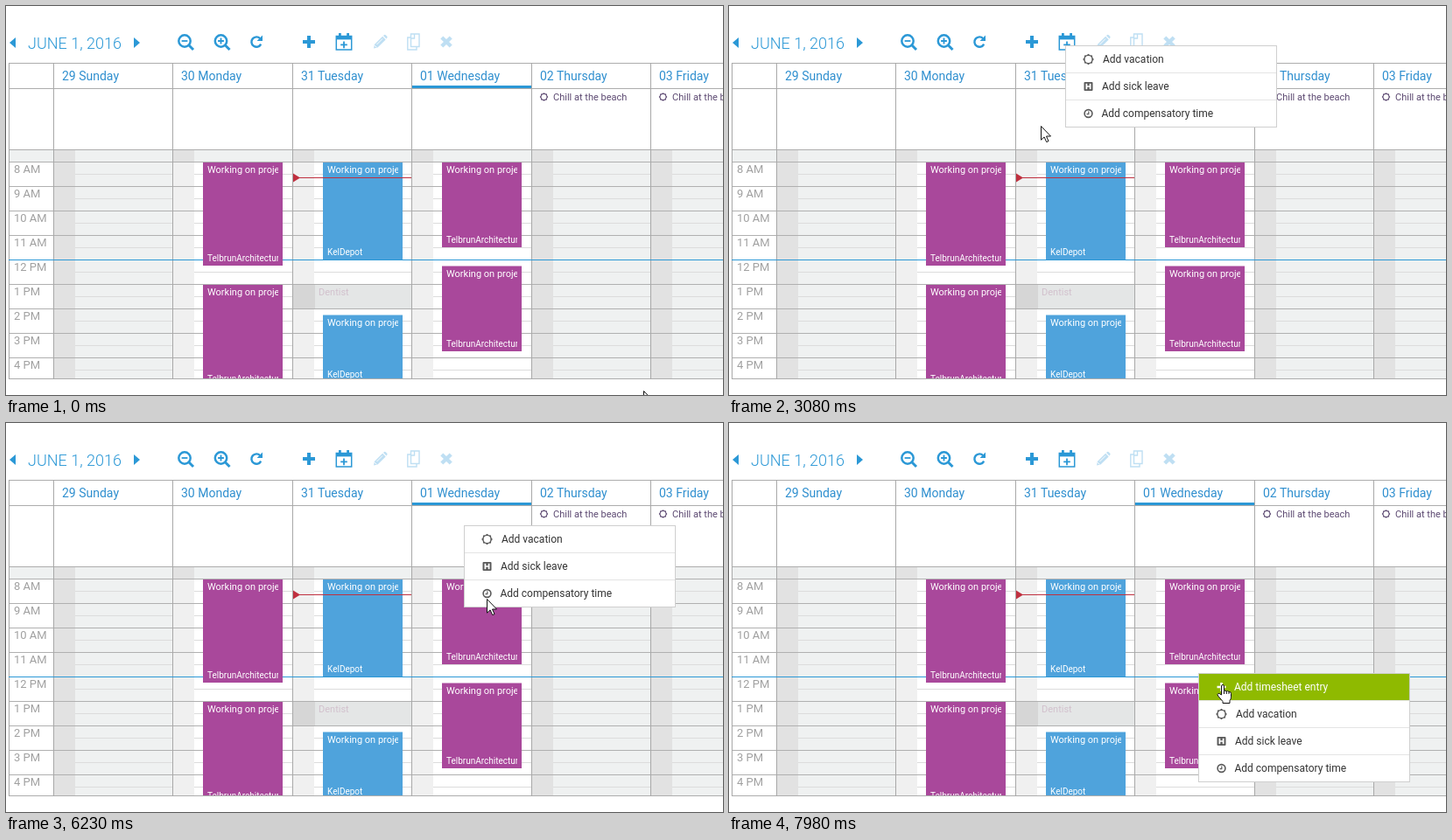
An HTML page that plays this animation: 819x445 px, repeating every 8 s.

```html
<!DOCTYPE html>
<html lang="en">
<head>
<meta charset="utf-8">
<title>Calendar context menu</title>
<style>
html, body { margin: 0; height: 100%; overflow: hidden; background: #fff; }
svg { display: block; }
text { font-family: Roboto, Arial, sans-serif; white-space: pre; }
.line { fill: none; stroke: currentColor; }
.solid { fill: currentColor; }
</style>
</head>
<body>
<svg width="819" height="445" viewBox="0 0 819 445">
  <g id="page"></g>
  <g id="live"></g>
</svg>
<script>
const BLUE = '#2b98d6', PALE = '#bfdff3', PURPLE = '#a9489b', SKY = '#4fa3dc', GREEN = '#8fba00';
const LOOP = 8000, TICK = 70, BOTTOM = 426;

const rect = (x, y, w, h, fill) => `<rect x="${x}" y="${y}" width="${w}" height="${h}" fill="${fill}"/>`;
const text = (x, y, size, fill, s, weight = 400) =>
  `<text x="${x}" y="${y}" font-size="${size}" font-weight="${weight}" fill="${fill}">${s}</text>`;
const at = (x, y, body, color = BLUE) => `<g transform="translate(${x} ${y})" color="${color}">${body}</g>`;
const crop = (x, y, w, h, body) => `<svg x="${x}" y="${y}" width="${w}" height="${h}">${body}</svg>`;
const solid = d => `<path class="solid" fill-rule="evenodd" d="${d}"/>`;
const line = (d, w) => `<path class="line" stroke-width="${w}" d="${d}"/>`;

// Icons, each centred on its own origin
const ring = (r, w) => `<circle class="line" r="${r}" stroke-width="${w}"/>`;
function sun(r) {
  let d = '';
  for (let i = 0; i < 16; i++) {
    const a = i * Math.PI / 8, q = i % 2 ? r * .82 : r;
    d += (i ? 'L' : 'M') + (q * Math.cos(a)).toFixed(2) + ' ' + (q * Math.sin(a)).toFixed(2);
  }
  const c = r * .62;
  return solid(`${d}ZM${-c} 0a${c} ${c} 0 1 0 ${2 * c} 0a${c} ${c} 0 1 0 ${-2 * c} 0Z`);
}
const icons = {
  sun: sun(6.3),
  smallSun: sun(4.8),
  sick: solid('M-4 -5H4Q5 -5 5 -4V4Q5 5 4 5H-4Q-5 5 -5 4V-4Q-5 -5 -4 -5ZM-3 -3.3V3.3H-1.2V.8H1.2V3.3H3V-3.3H1.2V-.8H-1.2V-3.3Z'),
  clock: ring(4.4, 1.6) + line('M.3 -2.6V.6H-2', 1.2),
  add: line('M-5 0H5M0 -5V5', 2.6),
  zoomOut: ring(6.7, 2.5) + line('M4.8 4.8L10 10', 3) + line('M-3.4 0H3.4', 1.8),
  zoomIn: ring(6.7, 2.5) + line('M4.8 4.8L10 10', 3) + line('M-3.4 0H3.4M0 -3.4V3.4', 1.8),
  reload: line('M4.3 -3.8A5.7 5.7 0 1 0 5.2 2.6', 2.4) + solid('M7 -7.5V-1H.6Z'),
  plus: line('M-7 0H7M0 -7V7', 4),
  calendar: line('M-8.7 -6.4H8.7V9H-8.7Z', 1.5) + line('M-8.7 -4.6H8.7', 4) +
    line('M-4.6 -10V-5M4.6 -10V-5', 2.8) + line('M-3.8 3.4H3.8M0 -.4V7.2', 1.8),
  pencil: solid('M-7.5 7.5L-6.6 3L2.6 -6.2L6.2 -2.6L-3 6.6ZM3.5 -7L4.6 -8Q5.4 -8.5 6.2 -7.8L7.8 -6.2Q8.4 -5.4 7.8 -4.6L7 -3.6Z') +
    '<path d="M-6.4 4.2L-4.2 6.4M-4 3L2.5 -3.5" stroke="#fff"/>',
  copy: line('M-3 -9H6.5V5.5H-3ZM-3 -5H-6.7V9H3.5V5.5M-3 -4H1V-9', 1.4),
  cross: line('M-5.2 -5L5.2 5M5.2 -5L-5.2 5', 4.4)
};

function toolbar() {
  return solidBlue('M11 36V48L4 42Z') + solidBlue('M146 36V48L153 42Z') +
    text(25, 49, 18, BLUE, 'JUNE 1, 2016', 300) +
    at(204, 40, icons.zoomOut) + at(245.5, 40, icons.zoomIn) + at(286, 41, icons.reload) +
    at(346, 41, icons.plus) + at(427.5, 41, icons.pencil, PALE) +
    at(465.5, 41, icons.copy, PALE) + at(503, 41, icons.cross, PALE);
}
function solidBlue(d) { return `<path fill="${BLUE}" d="${d}"/>`; }

function grid() {
  const cols = [54, 190, 327, 463, 600, 736, 873];
  const days = ['29 Sunday', '30 Monday', '31 Tuesday', '01 Wednesday', '02 Thursday', '03 Friday'];
  const hours = ['8 AM', '9 AM', '10 AM', '11 AM', '12 PM', '1 PM', '2 PM', '3 PM', '4 PM'];
  let s = rect(3, 165, 51, 13, '#eff1f1');
  days.forEach((day, i) => {
    const x = cols[i], w = cols[i + 1] - x, off = i === 0 || i > 3;
    s += rect(x, 165, w, off ? 261 : 13, '#eff1f1') + rect(x, 165, 25, 261, off ? '#e2e2e2' : '#f0f0f0') +
      rect(x, 165, 25, 13, '#e2e2e2');
    for (let y = 192; y < BOTTOM; y += 28) s += rect(x + 25, y, w - 25, 1, '#dcdcdc');
    s += text(x + 10, 85, 14, '#2f8fcf', day);
    if (i > 3) s += at(x + 14.5, 104, icons.smallSun, '#5d4a72') + text(x + 25, 108, 11, '#5d4a72', 'Chill at the beach');
  });
  s += rect(328, 319, 25, 27, '#d6d6d6') + rect(353, 319, 110, 27, '#e4e6e6') + text(357, 331, 11, '#d2c1cd', 'Dentist');
  hours.forEach((h, i) => s += text(9, 191 + 28 * i, 13, '#a0a0a0', h) + rect(3, 178 + 28 * i, 816, 1, '#b0b0b0'));
  for (const y of [65, 94, 164, BOTTOM]) s += rect(3, y, 816, 1, '#adadad');
  for (const x of [3, ...cols]) s += rect(x, 65, 1, 362, '#a8a8a8');
  return s + rect(464, 91, 136, 3, BLUE) + rect(3, 290, 816, 1, BLUE);
}

function booking(x, top, bottom, color, client) {
  const h = Math.min(bottom, BOTTOM) - top;
  return rect(x, top, 91, h, color) + crop(x, top, 86, h,
    text(5, 12.2, 11, '#fff', 'Working on project') + text(5, bottom - top - 5, 10, '#fff', client));
}

function bookings() {
  const a = 'TelbrunArchitecture', b = 'KelDepot';
  return booking(225, 179, 297, PURPLE, a) + booking(225, 319, 435, PURPLE, a) +
    booking(362, 179, 290, SKY, b) + booking(362, 353.5, 430, SKY, b) +
    booking(498, 179, 276, PURPLE, a) + booking(498, 297.5, 395, PURPLE, a) +
    rect(328, 196, 135, 1, '#c0303f') + '<path fill="#c0303f" d="M328 191.5V201.5L336 196.5Z"/>';
}

// Menus slide out from under their top edge
const absence = [['sun', 'Add vacation', 43], ['sick', 'Add sick leave', 42], ['clock', 'Add compensatory time', 41.5]];
const full = [['add', 'Add timesheet entry', 41], ...absence];

function menu(x, y, items, open, hot) {
  if (open <= 0) return '';
  const h = 31 * items.length + 1;
  let s = rect(.5, .5, 241, h - 1, '#fff" stroke="#cfcfcf');
  items.forEach(([icon, label, dx], i) => {
    const top = 31 * i, on = i === hot;
    if (i) s += rect(1, top, 240, 1, '#e4e4e4');
    if (on) s += rect(1, top + 1, 240, 30, GREEN);
    s += at(26.5, top + 16, icons[icon], on ? '#fff' : '#5a5a5a') + text(dx, top + 20, 12, on ? '#fff' : '#333', label);
  });
  return crop(x, y, 242, h * open, at(0, -h * (1 - open), s));
}

const clamp = v => Math.max(0, Math.min(1, v));
function openness(t, start, close = Infinity) {
  const grow = .5 - Math.cos(Math.PI * clamp((t - start) / 280)) / 2;
  return grow * (1 - clamp((t - close) / 140));
}

// Pointer path: time, x, y
const path = [
  [0, 728, 440], [560, 370, 62], [770, 385, 46], [2590, 385, 46], [3010, 356, 143], [3080, 356, 137],
  [3290, 356, 137], [3500, 514, 161], [3570, 514, 161], [3780, 514, 153], [4060, 514, 153], [4270, 523, 120],
  [4410, 523, 120], [4480, 523, 117], [5320, 523, 117], [5600, 566, 139], [5950, 552, 160], [6160, 552, 160],
  [6370, 542, 283], [6930, 542, 283], [7070, 536, 286], [7840, 536, 286], [7980, 563, 299], [LOOP, 563, 299]
];
const outline = d => `<path d="${d}" fill="#fff" stroke="#111" stroke-linejoin="round"/>`;
const pointers = {
  arrow: outline('M.5 .5V16.2L4.1 12.9L6.7 18.6L9 17.6L6.5 12H11.5Z'),
  hand: outline('M-.5 12V2Q-.5 .5 1 .5T2.5 2V7.5Q4 6.3 5.3 8Q6.8 7 8 8.6Q10.5 8 10.5 10.5V14.5Q10.5 17 9 18.5V21.5H1V19.5L-4.5 13Q-5.6 11.3 -4.2 10.5Q-3 10 -.5 12Z') +
    '<path d="M2.5 7.5V11M5.3 8V11M8 8.6V11" stroke="#111"/>',
  resize: outline('M0 -9.5L4.5 -4.5H1.5V6.5H4.5L0 11.5L-4.5 6.5H-1.5V-4.5H-4.5Z')
};
const during = (t, spans) => spans.some(([a, b]) => t >= a && t < b);

function pointer(t) {
  const i = path.findIndex(k => k[0] > t), [t0, x0, y0] = path[i - 1], [t1, x1, y1] = path[i];
  const k = (t - t0) / (t1 - t0);
  const shape = during(t, [[700, 1050], [1820, 2660], [5390, 6230], [7910, LOOP]]) ? 'hand'
    : t === 6790 ? 'resize' : 'arrow';
  return at(Math.round(x0 + (x1 - x0) * k), Math.round(y0 + (y1 - y0) * k), pointers[shape]);
}

function scene(t) {
  const hover = during(t, [[700, 1050], [1820, 2660]]);
  const hot = during(t, [[5390, 5740]]) ? 0 : during(t, [[5740, 6230]]) ? 1 : -1;
  return at(386, 41, icons.calendar, hover ? '#2380bb' : BLUE) +
    menu(384, 45, absence, openness(t, 985, 3850), -1) +
    menu(523, 117, absence, openness(t, 4835, 6720), hot) +
    menu(536, 286, full, openness(t, 7425), t >= 7910 ? 0 : -1) +
    pointer(t);
}

const live = document.getElementById('live');
document.getElementById('page').innerHTML = toolbar() + grid() + bookings();
let shown = -1;
function draw() {
  const t = Math.floor(performance.now() % LOOP / TICK) * TICK;
  if (t !== shown) live.innerHTML = scene(shown = t);
  requestAnimationFrame(draw);
}
draw();
</script>
</body>
</html>
```
